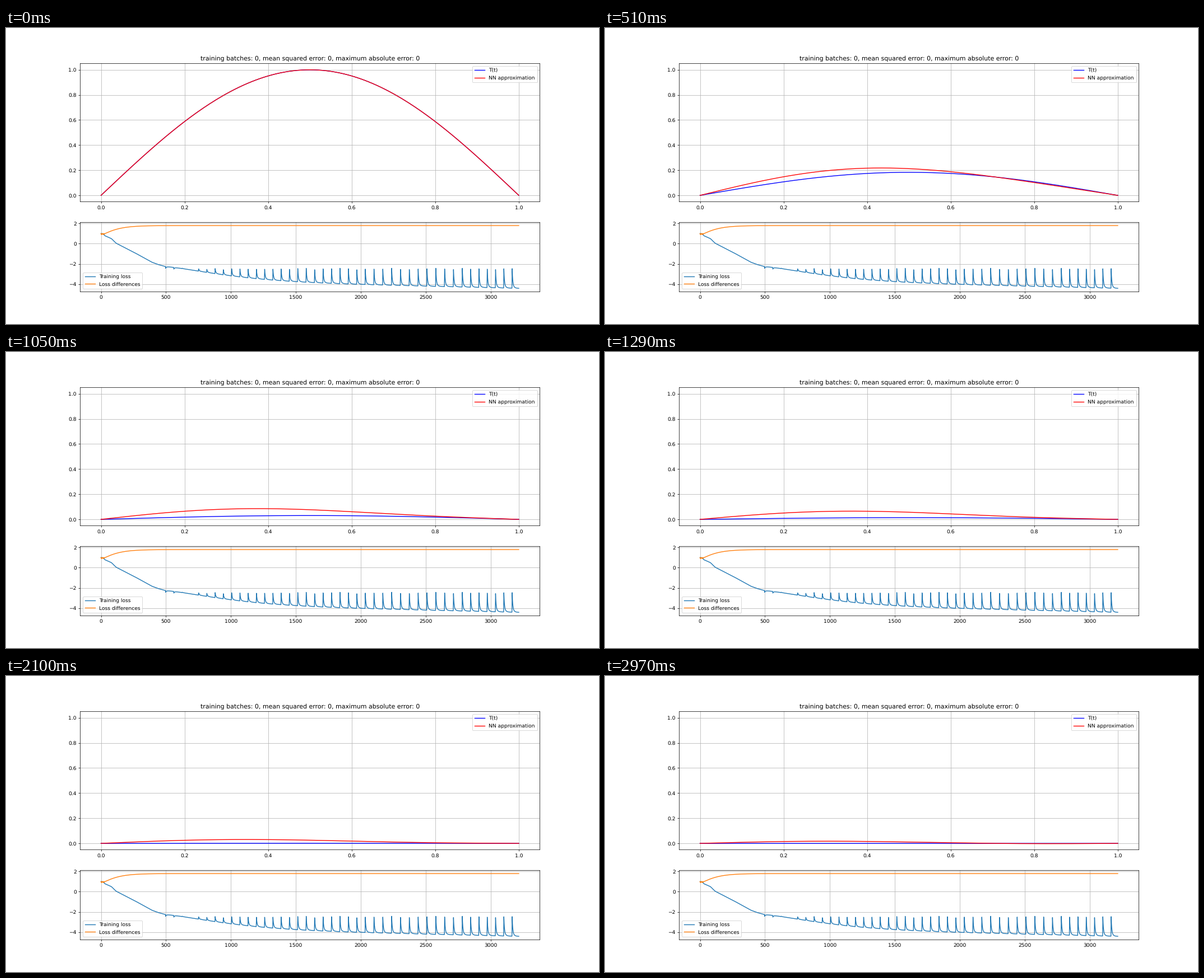
Write a matplotlib script that moves like this. It is 1058 px wide and 529 px high and loops after 3 s.

```python
import numpy as np
import matplotlib.pyplot as plt
from matplotlib.animation import FuncAnimation

FRAMES = 100
STEPS = 3217

plt.rcParams["text.hinting"] = "no_hinting"


def smooth(x, xs, ys):
    """Cubic Hermite curve through a few knots."""
    xs, ys = np.asarray(xs, float), np.asarray(ys, float)
    m = np.gradient(ys, xs)
    i = np.clip(np.searchsorted(xs, x, side="right") - 1, 0, len(xs) - 2)
    h = xs[i + 1] - xs[i]
    u = (x - xs[i]) / h
    return ((1 + 2 * u) * (1 - u) ** 2 * ys[i] + u * (1 - u) ** 2 * h * m[i]
            + u * u * (3 - 2 * u) * ys[i + 1] + u * u * (u - 1) * h * m[i + 1])


def exact(x, t):
    """Heat equation solution for a sine start."""
    return np.exp(-np.pi ** 2 * t) * np.sin(np.pi * x)


def network(x, t):
    """Two sine modes: a slowing decay plus a lopsided error."""
    keys = [0, .08, .27, .43, .6, 1]
    a = np.exp(smooth(t, keys, [0, -.797, -2.175, -2.85, -3.36, -4.537]))
    b = smooth(t, keys, [0, .018, .0222, .0182, .0122, .009])
    return a * np.sin(np.pi * x) + b * np.sin(2 * np.pi * x)


def loss_curve(step):
    rng = np.random.default_rng(4)
    # Fast early drop, then a slow stretched decay
    early = np.interp(step, [0, 18, 26, 80, 115, 260, 390, 440, 500],
                      [1, .98, .8, .5, .05, -.9, -1.82, -2.06, -2.27])
    s = np.maximum(step - 500, 0)
    late = -3.44 - .0003 * step + 1.32 * np.exp(-(s / 569) ** 1.4)
    base = np.where(step < 500, early, late)
    pad = 6
    base = np.convolve(np.pad(base, pad, mode="edge"),
                       np.ones(2 * pad + 1) / (2 * pad + 1), "valid")

    # Regular spikes: sharp rise, quick fall and a short tail
    loss = base.copy()
    for k in range(42):
        pos = int(np.interp(k, [0, 16, 24, 35, 41],
                            [498, 1515, 2035, 2782, 3166]))
        top = min(base[pos] + .1 + .075 * k, rng.uniform(-2.6, -2.42))
        d = step - pos
        after = np.maximum(d, 0)
        fall = .75 * np.exp(-after / 4) + .25 * np.exp(-after / 11)
        loss += (top - base[pos]) * fall * np.clip(1 + d / 2, 0, 1)
    return loss


def gap_curve(step):
    rng = np.random.default_rng(4)
    s = np.maximum(step - 20, 0)
    gap = 1.778 - .84 * np.exp(-(s / 115) ** 1.15)
    return gap + rng.uniform(-.05, .05, step.size) * (step < 26)


fig, (ax, ax2) = plt.subplots(2, 1, figsize=(16, 8), dpi=66.125,
                              gridspec_kw={"height_ratios": [2, 1]})

x = np.linspace(0, 1, 201)
true_line, = ax.plot(x, exact(x, 0), "b", label="T(t)")
net_line, = ax.plot(x, network(x, 0), "r", label="NN approximation")
ax.set(xlim=(-.05, 1.05), ylim=(-.05, 1.05),
       xticks=np.linspace(0, 1, 6), yticks=np.linspace(0, 1, 6))
ax.set_title("training batches: 0, mean squared error: 0, "
             "maximum absolute error: 0")
ax.legend(loc="upper right")
ax.grid()

step = np.arange(STEPS + 1)
ax2.plot(step, loss_curve(step), label="Training loss")
ax2.plot(step, gap_curve(step), label="Loss differences")
ax2.set(xlim=(-.05 * STEPS, 1.05 * STEPS), ylim=(-4.71, 2.095),
        xticks=range(0, 3001, 500), yticks=(-4, -2, 0, 2))
ax2.legend(loc="lower left")
ax2.grid()


def update(i):
    t = i / (FRAMES - 1)
    true_line.set_ydata(exact(x, t))
    net_line.set_ydata(network(x, t))
    return true_line, net_line


anim = FuncAnimation(fig, update, frames=FRAMES, interval=30,
                     repeat=True, repeat_delay=0)
plt.show()
```
